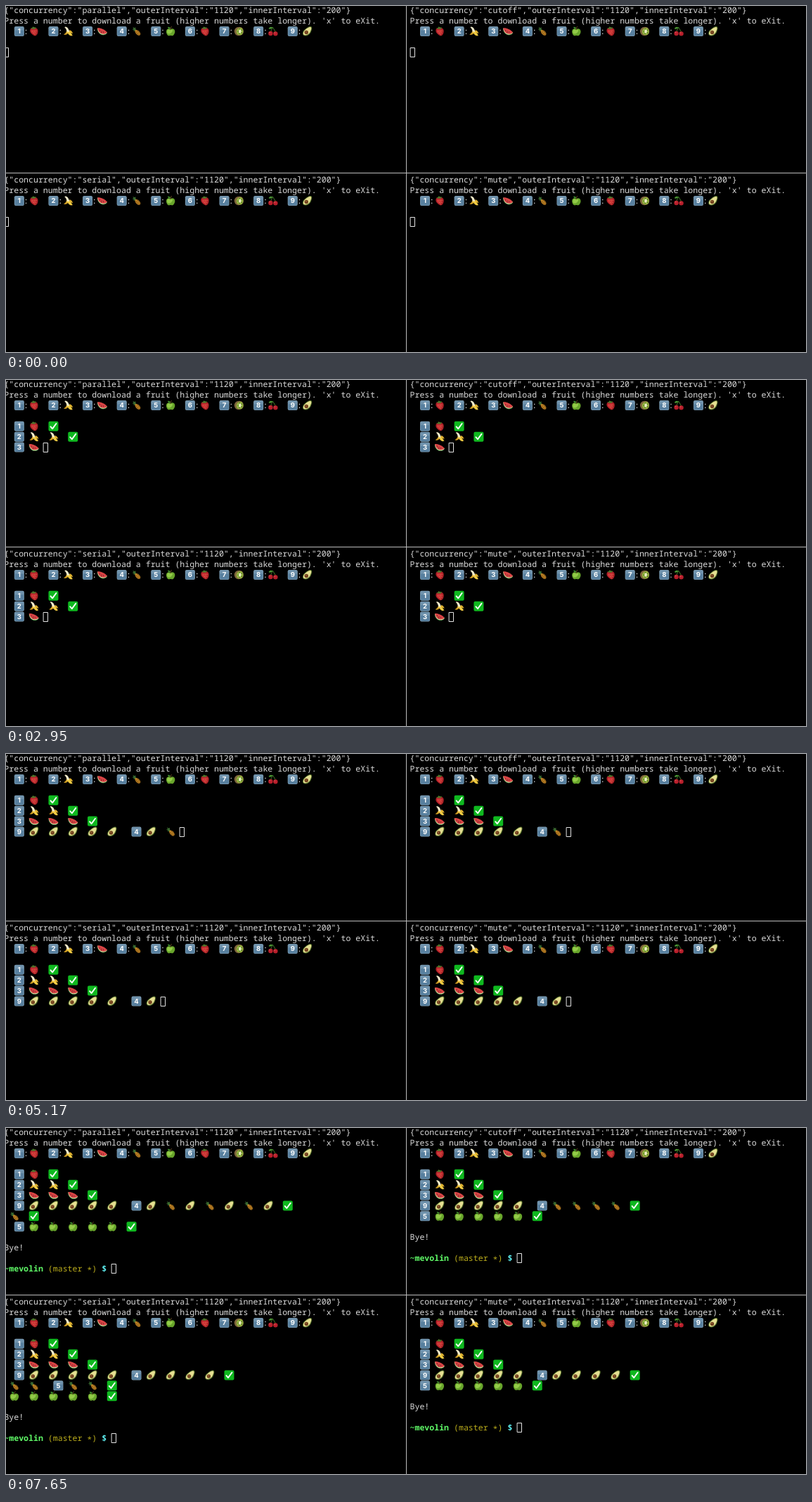
An HTML page with a canvas that plays this animation: 1138 px wide and 492 px high, repeating every 8000 ms.

```html
<!DOCTYPE html>
<html lang="en">
<head>
<meta charset="utf-8">
<title>Fruit downloads</title>
<style>
  html, body { margin: 0; width: 100%; height: 100%; overflow: hidden; background: #000; }
  canvas { display: block; }
</style>
</head>
<body>
<canvas id="stage" width="1138" height="492"></canvas>
<script>
const ctx = document.getElementById('stage').getContext('2d');
const LOOP = 8000;
const CELL = 6.945, ROW = 14.9;
const MONO = '11.575px "Noto Sans Mono", "DejaVu Sans Mono", monospace';
const GREY = '#dadada';

// Icons are layers of [colour, path, optional line width], centred on 0,0.
const STRAWBERRY = [
  ['#ad1f27', 'M-4.6-3.6C-7-.5-4.6 4 .6 6.4C4.2 7.2 6.6 2 5.6-2C4.6-5.6-2-6.4-4.6-3.6Z'],
  ['#cc3036', 'M-3.6-2.2C-5 .5-2.4 3.5 .4 4.6C3 4 3.6 0 3-2.4Z'],
  ['#4d7a2c', 'M-5-4.2L-2.4-5L-1.4-6.7L.2-5.6L3.8-5.2L1.8-4L1.4-2.6L-.6-3.7L-2.8-2.8L-2.8-3.9Z'],
  ['#d88c52', 'M-2.6 .2h.8M.4 0h.8M3.2-.6h.8M-.6 2.6h.8M2.4 2.4h.8M1 4.8h.8', 0.6]
];
const ICONS = {
  a: STRAWBERRY,
  b: [
    ['#d3a024', 'M-1.8-1C-2.6 1.6-4 3.4-6.3 4.6C-3.8 5.6-1 4.6 .4 2Z'],
    ['#f4ecca', 'M-5-5.8C-4-7.2-1.4-6.4 .2-3.8L2.6 1.4L-1.6 2C-1.8-1.4-2.8-3.8-5-5.8Z'],
    ['#f0cb42', 'M-1.8-.2C-1 2.8 1.4 6 5 6.6L6.4 5.4C4.6 3.6 3.8 1.8 2.6-1L.8 1.4Z'],
    ['#e0b230', 'M2-1.6C4.4-1.2 6 .6 6.8 3C4.6 2.8 3 1.8 1.8 .2Z'],
    ['#5d4a1e', 'M5 6.6L6.4 5.4L6.8 6.6Z']
  ],
  c: [
    ['#3d7f38', 'M-7-4.4C-7 2.2-2.6 6.2 3 5.4C5.2 5 6.8 3.6 7 1.8Z'],
    ['#dfe0b0', 'M-6.8-4.4C-6.6 1.6-2.4 5.4 2.8 4.6C5 4.2 6.4 3.2 6.8 1.6Z'],
    ['#d94445', 'M-6.8-4.6C-5.8 1-2 4.4 2.4 3.8C4.6 3.4 6.2 2.6 6.8 1.2C3.4-2.4-2-5-6.8-4.6Z'],
    ['#4a1717', 'M-3.4-1.6v.8M-1 0v.8M1.6 .8v.8M-1.2 2v.6', 0.7]
  ],
  d: [
    ['#3a6b30', 'M-6.2-3L-4.2-3.4L-5-6.2L-2.8-4.6L-1.2-5.6L-1-3L.2-1.6L-1.6-.2L-4.8-.6L-3.4-1.6Z'],
    ['#bf8426', 'M-1.8-1.4C.6-3 4.4-.2 5.6 3C6.2 5 4.6 6.6 2.4 5.8C-.4 4.4-2.8 .8-1.8-1.4Z'],
    ['#7d4f12', 'M-1.6 .6L4.4 5.6M.6-1.6L5.4 3.4M-.8 2.4L2.4-1.4M.8 4.4L4.4 .4M3 5.8L5.4 2.8', 0.6]
  ],
  e: [
    ['#68a52b', 'M0-3C2-4.6 6.4-3.8 6.2 .6C6 4.2 3.4 7 1.6 6.4C.6 6-.6 6-1.6 6.4C-3.6 7-6 4.2-6.2 .6C-6.4-3.8-2-4.6 0-3Z'],
    ['#93cb48', 'M-2.8-2.6C-5.4-2-5.4 1.6-4 3.4C-1 4.4 2.6 2.4 3-1.6C1.6-2.6 .4-1.4-1.4-2Z'],
    ['#6a4a24', 'M0-2.4C0-4.4 .4-5.4 1.2-6.6', 1],
    ['#3f8f2e', 'M-.2-4C-2.4-3.4-3.8-4.4-4.2-6C-2.4-6.6-.6-6-.2-4Z']
  ],
  f: STRAWBERRY,
  g: [
    ['#80673c', 'M-6.4 1.2C-7.4-2.6-4.2-6.2 .4-6.2C5-6.2 6.8-2.6 6.6 .8C6.2 4.8 2.6 6.6-1 6.2C-4 6-5.8 4-6.4 1.2Z'],
    ['#93b63e', 'M-3.6 1C-3.8-2.8-.8-5.2 2-5C5-4.8 6.2-2 6 .8C5.6 4 3.6 5.6 1 5.4C-1.6 5.2-3.4 3.6-3.6 1Z'],
    ['#e9edc0', 'M-.4 .4C-.4-1.4 .8-2.6 2-2.4C3.2-2.2 3.6-.6 3.2 .8C2.8 2.2 1.8 3 1 2.8C.2 2.6-.4 1.6-.4 .4Z'],
    ['#28331a', 'M-1.2 0v.8M.6-3.4h.6M4-2v.8M4 1.8v.8M.2 3.4h.8', 0.8]
  ],
  h: [
    ['#4f8d31', 'M-3.6 1.4C-2.8-2-1.2-4-.6-5.8C.8-3 3 -1 3.6 2', 0.9],
    ['#4c9a35', 'M-.8-5.4C-3-7.2-5.4-6-6.4-3.6C-4-2.8-2-3.6-.8-5.4Z'],
    ['#b81f2b', 'M-6.8 3A3.2 3.2 0 1 1-.4 3A3.2 3.2 0 1 1-6.8 3ZM.2 3.4A3.2 3.2 0 1 1 6.6 3.4A3.2 3.2 0 1 1 .2 3.4Z'],
    ['#e8666a', 'M-5.2 1.8h1.2M1.8 2.2h1.2', 0.8]
  ],
  i: [
    ['#55702c', 'M5.6-6.6C7.4-5.4 6.6-2.2 5.2 1C3.6 4.8-.6 7.2-4.2 6.4C-7.4 5.4-7.2 1.4-4.8-1.4C-1.8-4.4 3-8.4 5.6-6.6Z'],
    ['#e5df92', 'M5-5.8C6.4-4.8 5.4-2.2 4.2 .6C2.8 4-.8 6-4 5.4C-6.6 4.4-6 1.4-4-1C-1.2-4 3.2-7 5-5.8Z'],
    ['#71421f', 'M-4 1.6A2.7 2.7 0 1 1 1.4 1.6A2.7 2.7 0 1 1-4 1.6Z'],
    ['#a56f3d', 'M-2.4 .8h1.2', 1]
  ],
  '!': [
    ['#0fb81f', 'M-5-7H5Q7-7 7-5V5Q7 7 5 7H-5Q-7 7-7 5V-5Q-7-7-5-7Z'],
    ['#fff', 'M-4 .6L-1.4 3.6L4-3.8', 1.9]
  ],
  key: [
    ['#86a5ba', 'M-4.8-7H4.8Q7-7 7-4.8V4.8Q7 7 4.8 7H-4.8Q-7 7-7 4.8V-4.8Q-7-7-4.8-7Z'],
    ['#58809f', 'M-4.6-6.3H4.6Q6.4-6.3 6.4-4.5V4.7Q6.4 6.5 4.6 6.5H-4.6Q-6.4 6.5-6.4 4.7V-4.5Q-6.4-6.3-4.6-6.3Z'],
    ['#7093ad', 'M-4.6-6.3H4.6Q6.4-6.3 6.4-4.5V-1.5H-6.4V-4.5Q-6.4-6.3-4.6-6.3Z']
  ]
};
for (const layers of new Set(Object.values(ICONS)))
  for (const layer of layers) layer[1] = new Path2D(layer[1]);

// Output script: time:tokens. Digit = key pressed, letter = fruit, ! = done, x = exit.
const START = '500:1 710:a! 1610:2 1790:b 2060:b! 2770:3 2950:c 3130:c 3300:c! ' +
  '3840:9 4020:i 4290:i 4470:i 4640:i 4820:i 4910:4 ';
const AVOCADOS = '4990:i 5260:i 5430:i 5610:i! ';
const APPLES = '6050:5 6230:e 6400:e 6580:e 6840:e 7020:e! 7290:x';

function pane(mode, x, y, script) {
  const events = (START + script).split(' ').map(part => {
    const [time, out] = part.split(':');
    return { time: +time, out };
  });
  return { mode, x, y, events };
}
const LEFT = -2.7, RIGHT = 574.5, TOP = -1.3, BOTTOM = 239.7;
const PANES = [
  pane('parallel', LEFT, TOP,
    '4990:i 5170:d 5260:i 5350:d 5430:i 5520:d 5610:i! 5700:d! ' + APPLES),
  pane('cutoff', RIGHT, TOP, '5170:d 5350:d 5520:d 5700:d! ' + APPLES),
  pane('serial', LEFT, BOTTOM, AVOCADOS +
    '5780:d 6050:d5 6230:d 6400:d! 6670:e 6840:e 7020:e 7200:e 7380:e! 7650:x'),
  pane('mute', RIGHT, BOTTOM, AVOCADOS + APPLES)
];

function drawPane({ mode, x, y, events }, now) {
  let col = 0, row = 0;

  function print(text, colour = GREY, weight = '') {
    ctx.font = weight + ' ' + MONO;
    ctx.fillStyle = colour;
    ctx.textAlign = 'left';
    const base = Math.round(y + row * ROW + 11.4);
    for (const ch of text) {
      const drop = ch === '*' ? 2 : 0;
      if (ch !== ' ') ctx.fillText(ch, x + col * CELL, base + drop);
      col++;
    }
  }

  function newline(count = 1) {
    row += count;
    col = 0;
  }

  function icon(name) {
    ctx.save();
    ctx.translate(x + (col + 1) * CELL + 0.7, y + (row + 0.5) * ROW);
    for (const [colour, path, width] of ICONS[name]) {
      ctx.fillStyle = ctx.strokeStyle = colour;
      if (width) {
        ctx.lineWidth = width;
        ctx.stroke(path);
      } else ctx.fill(path);
    }
    ctx.restore();
    col += 2;
  }

  function key(digit) {
    col += 2;
    icon('key');
    ctx.font = 'bold 9.5px Inter, "Open Sans", sans-serif';
    ctx.fillStyle = '#fff';
    ctx.textAlign = 'center';
    ctx.fillText(digit, x + (col - 1) * CELL + 0.7, y + (row + 0.5) * ROW + 3.4);
  }

  function exit() {
    newline();
    print('Bye!');
    newline(2);
    print('~mevolin', '#5ff967', 'bold');
    print(' (master *)', '#bcae1c');
    print(' $ ', '#60f4f6', 'bold');
  }

  function put(token) {
    if (token === 'x') exit();
    else if (token >= '1' && token <= '9') key(token);
    else {
      col++;
      icon(token);
      col++;
      if (token === '!') newline();
    }
  }

  print(`{"concurrency":"${mode}","outerInterval":"1120","innerInterval":"200"}`);
  newline();
  print("Press a number to download a fruit (higher numbers take longer). 'x' to eXit.");
  newline();
  [...'abcdefghi'].forEach((fruit, i) => {
    key(String(i + 1));
    print(':');
    icon(fruit);
  });
  newline(2);

  for (const { time, out } of events)
    if (time <= now) [...out].forEach(put);

  ctx.strokeStyle = '#e4e4e4';
  ctx.lineWidth = 1;
  ctx.strokeRect(Math.round(x + col * CELL) + 0.5, Math.round(y + row * ROW + 0.6) + 0.5, 6, 13);
}

function draw(now) {
  ctx.fillStyle = '#000';
  ctx.fillRect(0, 0, 1138, 492);
  for (const p of PANES) drawPane(p, now);
  ctx.fillStyle = '#bdbdbd';
  ctx.fillRect(0, 237, 1138, 1);
  ctx.fillRect(569, 0, 1, 492);
}

ctx.textRendering = 'geometricPrecision';
ctx.lineCap = ctx.lineJoin = 'round';
const begin = performance.now();
function tick() {
  draw((performance.now() - begin) % LOOP);
  requestAnimationFrame(tick);
}
tick();
</script>
</body>
</html>
```
